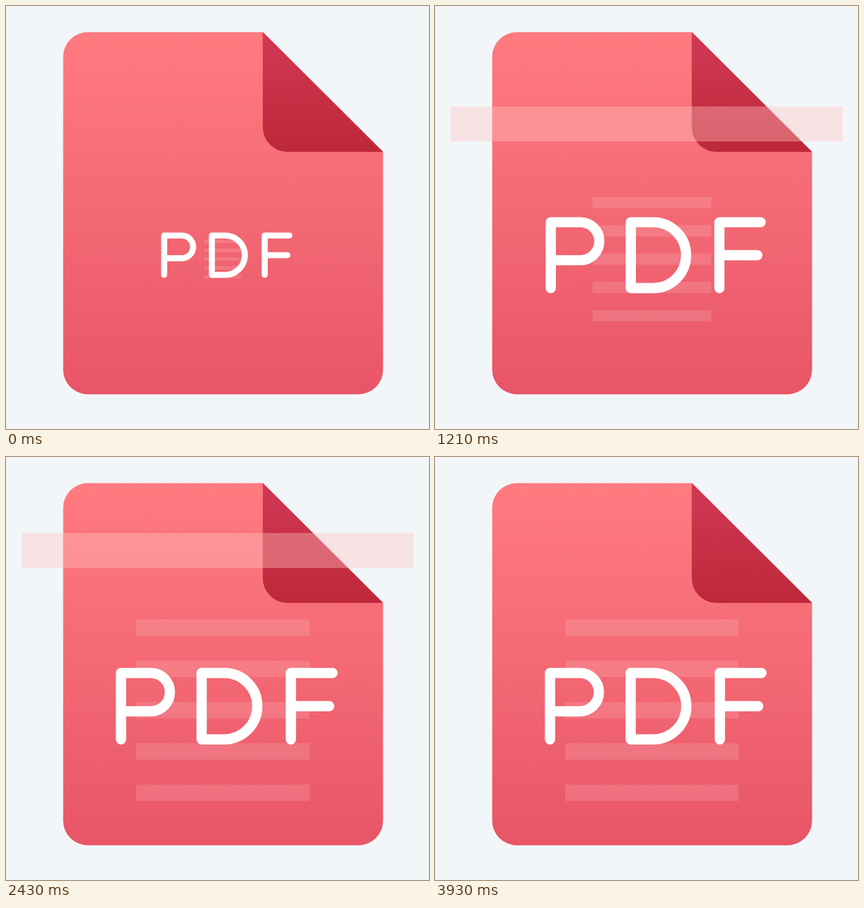
Recreate the animation shown at these times as an HTML page with a canvas. Size 640 by 640 pixels, loop 4070 ms.

```html
<!DOCTYPE html>
<html lang="en">
<head>
<meta charset="utf-8">
<title>PDF scan</title>
<style>
  html, body { margin: 0; width: 100%; height: 100%; overflow: hidden; background: #f2f6f9; }
  canvas { display: block; width: 640px; height: 640px; }
</style>
</head>
<body>
<canvas id="stage" width="640" height="640"></canvas>
<script>
const ctx = document.getElementById('stage').getContext('2d');
const LOOP = 4070, STEP = 71.45, LAST_STEP = 55;

const page = new Path2D('M123.5 39.6H389L570.5 220.4V550.4A37 37 0 0 1 533.5 587.4H123.5A37 37 0 0 1 86.5 550.4V76.6A37 37 0 0 1 123.5 39.6Z');
const fold = new Path2D('M388.5 39.6L570.5 220.8H426A37.5 37.5 0 0 1 388.5 183.3Z');
const letters = new Path2D(
  'M174 427.3V326.7H219A29 29 0 0 1 219 384.7H174' +
  'M296 326.7H330A50.3 50.3 0 0 1 330 427.3H296Z' +
  'M431 427.3V326.7H494M431 377H489');

// Scanner bar: time in ms, top edge in px
const barTrack = [
  [0, 642], [857, 293], [1143, 180], [1643, -15], [1780, -65], [2286, 73],
  [2429, 115], [2857, 270], [2929, 298], [3429, 467], [3929, 641]
];

function verticalGradient(top, bottom, ...colors) {
  const gradient = ctx.createLinearGradient(0, top, 0, bottom);
  colors.forEach((color, i) => gradient.addColorStop(i / (colors.length - 1), color));
  return gradient;
}
const pageFill = verticalGradient(40, 587, '#ff7b80', '#f46974', '#e85567');
const foldFill = verticalGradient(40, 220, '#d03955', '#bd2839');

function smooth(start, duration, t) {
  const u = Math.min(1, Math.max(0, (t - start) / duration));
  return u * u * (3 - 2 * u);
}

function along(track, t) {
  const i = Math.max(1, track.findIndex(([time]) => time >= t));
  const [t0, y0] = track[i - 1], [t1, y1] = track[i];
  return y0 + (y1 - y0) * Math.min(1, (t - t0) / (t1 - t0));
}

function scaledAbout(x, y, scale, paint) {
  ctx.save();
  ctx.translate(x, y);
  ctx.scale(scale, scale);
  ctx.translate(-x, -y);
  paint();
  ctx.restore();
}

function drawLines() {
  ctx.fillStyle = 'rgba(255,255,255,0.13)';
  for (let i = 0; i < 5; i++) ctx.fillRect(197, 245.6 + i * 62.5, 262.4, 24.8);
}

function drawLetters() {
  ctx.strokeStyle = '#fff';
  ctx.lineWidth = 15.5;
  ctx.lineCap = ctx.lineJoin = 'round';
  ctx.stroke(letters);
}

function draw(t) {
  ctx.fillStyle = '#f2f6f9';
  ctx.fillRect(0, 0, 640, 640);
  ctx.fillStyle = pageFill;
  ctx.fill(page);
  ctx.fillStyle = foldFill;
  ctx.fill(fold);

  scaledAbout(328.2, 383, 0.2125 + 0.7875 * smooth(-45, 2222, t), drawLines);
  scaledAbout(334, 377, smooth(-1760, 3134, t), drawLetters);

  ctx.fillStyle = 'rgba(255,194,192,0.385)';
  ctx.fillRect(24, Math.round(along(barTrack, t)), 593, 53);
}

function tick() {
  const t = performance.now() % LOOP;
  const step = Math.min(LAST_STEP, Math.floor((t + 5) / STEP));
  draw(Math.min(step * STEP, 3929));
  requestAnimationFrame(tick);
}
tick();
</script>
</body>
</html>
```
